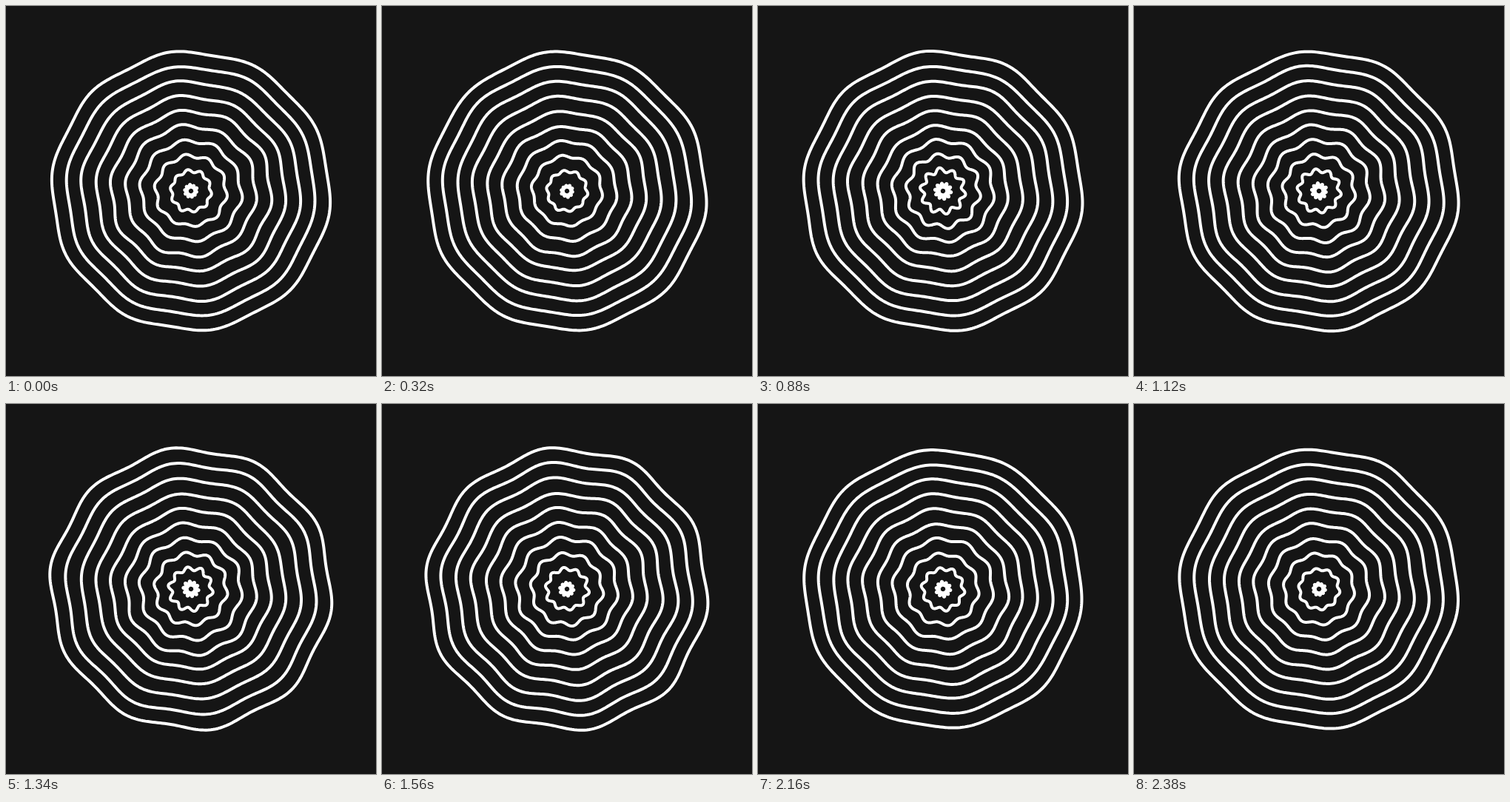
An HTML page with a canvas that plays this animation: 500x500 px, repeating every 2.4 s.

```html
<!DOCTYPE html>
<html lang="en">
<head>
<meta charset="utf-8">
<title>Rippling rings</title>
<style>
  html, body { margin: 0; width: 100%; height: 100%; overflow: hidden; background: #151515; }
  canvas { display: block; width: 500px; height: 500px; }
</style>
</head>
<body>
<canvas id="stage" width="500" height="500"></canvas>
<script>
const ctx = document.getElementById('stage').getContext('2d');
const LOOP = 2400, STEP = 20, RINGS = 10, LOBES = 10, TAU = Math.PI * 2;
const LOBE_OFFSET = Math.PI / 20;

// Lobe height at a time, for the inner, middle and outer rings.
const swell = [
  [0, 3.5, 5, 4],
  [320, 3, 3.3, 4.2],
  [640, 4.5, 3.9, 4.7],
  [1120, 5.5, 5, 5.2],
  [1560, 4.5, 5, 7.6],
  [1920, 4.5, 5, 4.8],
  [2380, 3.4, 4, 4.8],
  [LOOP, 3.5, 5, 4]
];

const mix = (a, b, k) => a + (b - a) * k;
const ease = k => k * k * (3 - 2 * k);

function hash(a, b) {
  const v = Math.sin(a * 127.1 + b * 311.7) * 43758.5453;
  return v - Math.floor(v);
}

// Smooth noise from -1 to 1.
function noise(x, seed) {
  const i = Math.floor(x);
  return mix(hash(i, seed), hash(i + 1, seed), ease(x - i)) * 2 - 1;
}

function ringSwell(ring, time) {
  const i = swell.findIndex((row, n) => n && time < row[0]);
  const from = swell[i - 1], to = swell[i];
  const k = (time - from[0]) / (to[0] - from[0]);
  const at = n => mix(from[n], to[n], ease(k));
  const depth = ring / (RINGS - 1) * 2;
  const base = depth < 1 ? mix(at(1), at(2), depth) : mix(at(2), at(3), depth - 1);
  const flutter = Math.min(1, Math.sin(Math.PI * k) * 2);
  return base + flutter * 1.5 * noise(time / 70 - ring * 0.35, 3);
}

function drawRing(ring, time) {
  const radius = 5 + ring * 20;
  const height = ringSwell(ring, time);
  const heights = Array.from({ length: LOBES }, (_, lobe) =>
    Math.max(1.5, height + 0.9 * noise(time / 60, ring * LOBES + lobe + 11)));
  const points = 360;
  ctx.beginPath();
  for (let p = 0; p < points; p++) {
    const turn = p / points * TAU;
    const lobe = Math.round(turn / TAU * LOBES) % LOBES;
    const r = radius + heights[lobe] * (1 + Math.cos(LOBES * turn)) / 2;
    const angle = turn + LOBE_OFFSET;
    ctx.lineTo(250 + r * Math.cos(angle), 250 + r * Math.sin(angle));
  }
  ctx.closePath();
  ctx.stroke();
}

function draw(now) {
  const time = Math.floor(now % LOOP / STEP) * STEP;
  ctx.fillStyle = '#151515';
  ctx.fillRect(0, 0, 500, 500);
  ctx.strokeStyle = '#fff';
  ctx.lineWidth = 4;
  ctx.lineJoin = 'round';
  for (let ring = 0; ring < RINGS; ring++) drawRing(ring, time);
}

const start = performance.now();
function tick() {
  draw(performance.now() - start);
  requestAnimationFrame(tick);
}
tick();
</script>
</body>
</html>
```
